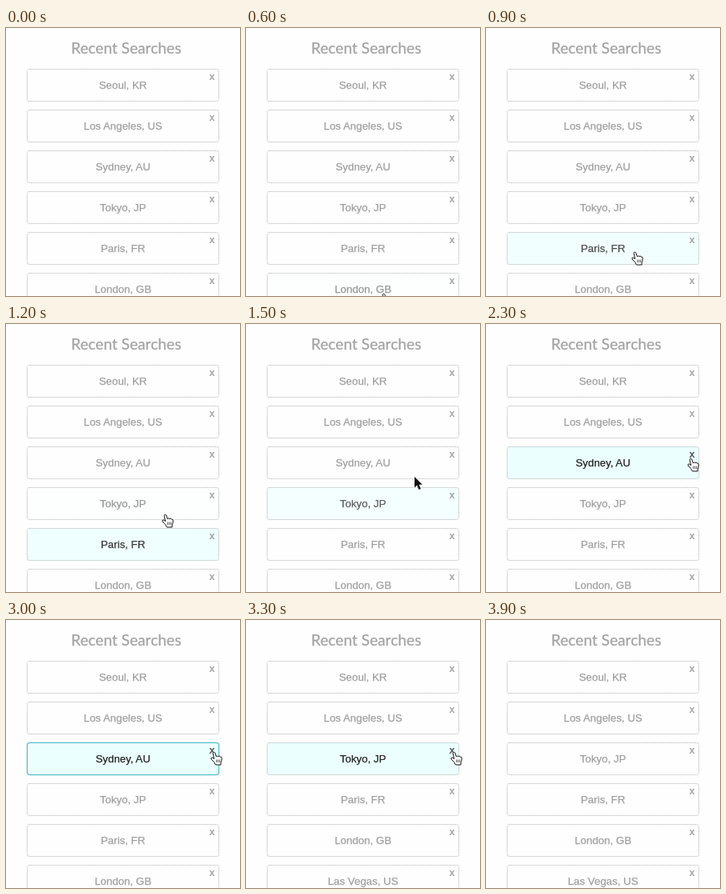
An HTML page for the animation above (4.7 s loop, 293x335 px).

```html
<!DOCTYPE html>
<html lang="en">
<head>
<meta charset="utf-8">
<style>
  html, body { margin: 0; width: 100%; height: 100%; overflow: hidden; background: #fefefe; }
  body { position: relative; font: 13.33px "Liberation Sans", Arial, sans-serif; text-align: center; -webkit-text-stroke: .25px; }
  h1 { position: absolute; left: 0; top: 13px; width: 301px; margin: 0; font: 19.2px/23px Lato, sans-serif; color: #a2a2a2; }
  .row { position: absolute; left: 26px; width: 241px; height: 41px; box-sizing: border-box; line-height: 39px; border: 1px dotted #b0b0b0; border-radius: 4px; }
  .row.pressed { border: 1px solid #45b9c5; box-shadow: 0 0 1px #45b9c5; }
  .row b { position: absolute; right: 4.5px; top: 2px; font-size: 12.5px; line-height: 14px; color: #a4a4a4; -webkit-text-stroke: 0; }
  .row b.over { color: #555; }
  svg { position: absolute; left: 0; top: 0; overflow: visible; stroke-linejoin: round; }
  #hand { fill: #fff; stroke: #111; }
  #arrow { fill: #111; stroke: #fff; stroke-width: 1.2; paint-order: stroke; }
</style>
</head>
<body>
<h1>Recent Searches</h1>
<svg id="pointer" width="1" height="1">
  <g id="hand">
    <path d="M-2 1.2Q-.8-.8 .7.9L2.4 6Q3.4 3.9 4.8 5.5Q6.2 4.2 7.2 6Q9.2 5.4 9.2 8Q9.4 11 8 13V16H1.5Q.5 13-4 9Q-4.8 6.8-2.6 7L-.4 8.6Z"/>
    <path d="M2.6 9.5V13M4.6 9.5V13M6.6 9.5V13" stroke-width=".7"/>
  </g>
  <path id="arrow" d="M0 0V13.4L3.1 10.6L5.4 16L7.9 15L5.6 9.7H9.8Z"/>
</svg>
<script>
const LOOP = 4700, STEP = 100, FADE = 300;
const PRESS = 3000, REMOVE = 3200, REMOVED = 2;
const cities = ['Seoul, KR', 'Los Angeles, US', 'Sydney, AU', 'Tokyo, JP', 'Paris, FR', 'London, GB', 'Las Vegas, US'];

// Pointer path: time, x, y of the tip
const path = [
  [600, 173, 332], [900, 187, 280], [1200, 200, 238], [1500, 211, 191],
  [1800, 232, 178], [2300, 257, 168], [2600, 261, 165], [3500, 261, 165], [3800, 291, 162]
];
// Hover spans: row slot, start, end
const hovers = [[5, 580, 700], [4, 700, 1150], [3, 1180, 1420], [2, 1600, 3580]];

const [pointer, hand, arrow] = ['pointer', 'hand', 'arrow'].map(id => document.getElementById(id));
const rows = cities.slice(1).map((_, slot) => {
  const box = document.createElement('div');
  const name = document.createElement('span'), close = document.createElement('b');
  box.style.top = 51 + slot * 51 + 'px';
  close.textContent = 'x';
  box.append(name, close);
  document.body.insertBefore(box, pointer);
  return { box, name, close };
});

const clamp = v => Math.max(0, Math.min(1, v));
const mix = (a, b, k) => `rgb(${a.map((v, i) => Math.round(v + (b[i] - v) * k))})`;

function glow(slot, t) {
  const span = hovers.find(h => h[0] === slot);
  if (!span || t < span[1]) return 0;
  const peak = clamp((Math.min(t, span[2]) - span[1]) / FADE);
  return clamp(peak - Math.max(0, t - span[2]) / FADE);
}

function pointerAt(t) {
  if (t < path[0][0] || t > path.at(-1)[0]) return null;
  const i = Math.max(1, path.findIndex(p => p[0] >= t));
  const [t0, x0, y0] = path[i - 1], [t1, x1, y1] = path[i];
  const k = (t - t0) / (t1 - t0);
  return [x0 + (x1 - x0) * k, y0 + (y1 - y0) * k];
}

function draw(now) {
  const t = Math.floor(now % LOOP / STEP) * STEP;
  const list = t < REMOVE ? cities : cities.filter((_, i) => i !== REMOVED);
  const tip = pointerAt(t);
  const hovered = hovers.find(h => t >= h[1] && t < h[2]);

  rows.forEach(({ box, name, close }, slot) => {
    const k = glow(slot, t);
    const pressed = slot === REMOVED && t >= PRESS && t < REMOVE;
    const overClose = tip && hovered && hovered[0] === slot && tip[0] > 252;
    name.textContent = list[slot];
    name.style.color = mix([158, 158, 158], [34, 34, 34], k);
    box.style.background = mix([254, 254, 254], [236, 255, 255], k);
    box.className = pressed ? 'row pressed' : 'row';
    close.className = overClose ? 'over' : '';
  });

  pointer.style.display = tip ? '' : 'none';
  if (tip) pointer.style.transform = `translate(${tip[0]}px, ${tip[1]}px)`;
  hand.style.display = hovered ? '' : 'none';
  arrow.style.display = hovered ? 'none' : '';
}

const start = performance.now();
function tick() {
  draw(performance.now() - start);
  requestAnimationFrame(tick);
}
tick();
</script>
</body>
</html>
```
